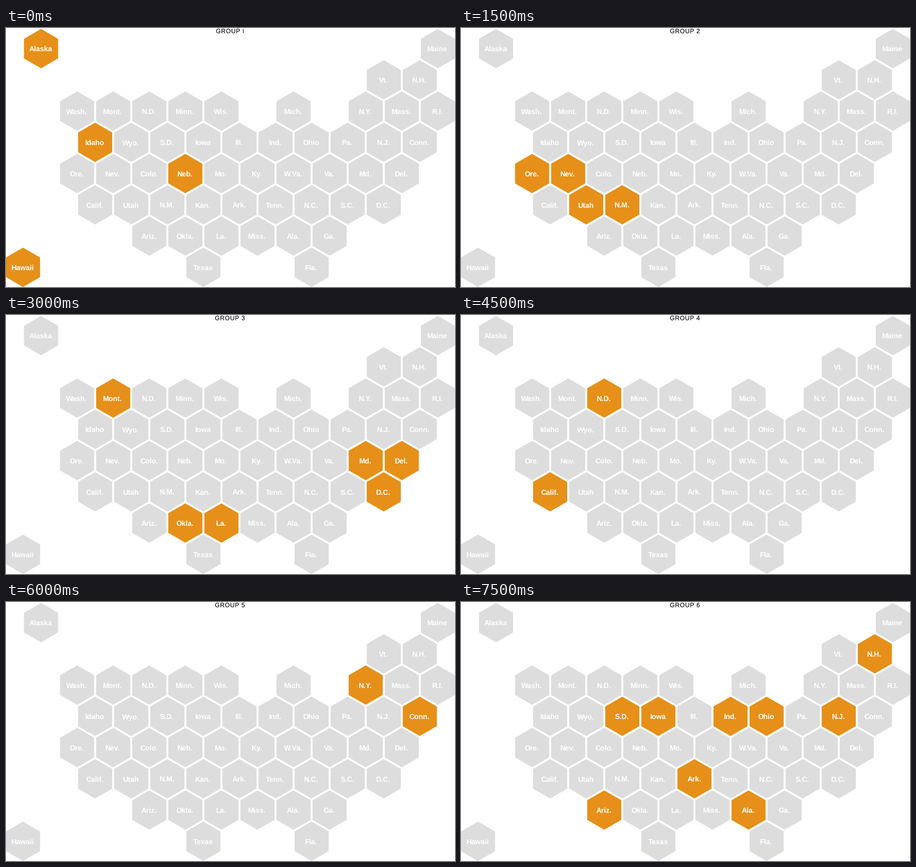
A matplotlib script that plays this animation: 985 by 569 pixels, repeating every 8000 ms.

```python
import matplotlib.pyplot as plt
from matplotlib.animation import FuncAnimation
from matplotlib.patches import PathPatch, RegularPolygon
from matplotlib.textpath import TextPath
from matplotlib.transforms import Affine2D

W, H, DPI = 985, 569, 64
PT = 72 / DPI  # points per pixel
ORANGE, GREY, INK = "#e69019", "#dddddd", "#222222"

# Hexagon grid: half-column and row steps, centre of the first cell
X0, Y0, DX, DY, RADIUS = 37.3, 45.3, 39.57, 68.63, 43.2

# Each run is (row, first half-column, labels two half-columns apart)
RUNS = [
    (0, 1, "Alaska"),
    (0, 23, "Maine"),
    (1, 20, "Vt. N.H."),
    (2, 3, "Wash. Mont. N.D. Minn. Wis."),
    (2, 15, "Mich."),
    (2, 19, "N.Y. Mass. R.I."),
    (3, 4, "Idaho Wyo. S.D. Iowa Ill. Ind. Ohio Pa. N.J. Conn."),
    (4, 3, "Ore. Nev. Colo. Neb. Mo. Ky. W.Va. Va. Md. Del."),
    (5, 4, "Calif. Utah N.M. Kan. Ark. Tenn. N.C. S.C. D.C."),
    (6, 7, "Ariz. Okla. La. Miss. Ala. Ga."),
    (7, 0, "Hawaii"),
    (7, 10, "Texas"),
    (7, 16, "Fla."),
]

GROUPS = [
    ("I", "Alaska Idaho Neb. Hawaii"),
    ("2", "Ore. Nev. Utah N.M."),
    ("3", "Mont. Md. Del. D.C. Okla. La."),
    ("4", "N.D. Calif."),
    ("5", "N.Y. Conn."),
    ("6", "N.H. S.D. Iowa Ind. Ohio N.J. Ark. Ariz. Ala."),
]

plt.rcParams["text.hinting"] = "none"
fig = plt.figure(figsize=(W / DPI, H / DPI), dpi=DPI, facecolor="white")
ax = fig.add_axes([0, 0, 1, 1])
ax.set_xlim(0, W)
ax.set_ylim(H, 0)
ax.axis("off")


def add_cell(row, col, label):
    x, y = X0 + col * DX, Y0 + row * DY
    cell = RegularPolygon((x, y), 6, radius=RADIUS, fc=GREY, lw=0)
    ax.add_patch(cell)
    ax.text(x - 0.7, y + 6, label, family="Liberation Sans", weight="bold",
            size=15.7 * PT, color="white", ha="center", va="baseline")
    return cell


def tracked_title(text, cx, baseline, size, tracking):
    """Draw letter-spaced text centred on cx and return its patches."""
    font = {"family": "Liberation Sans"}

    def outline(s):
        return TextPath((0, 0), s, size=size, prop=font)

    def right(s):
        return outline(s).get_extents().x1

    glyphs = [(outline(c), right(text[:i + 1]) - right(c) + i * tracking)
              for i, c in enumerate(text) if c != " "]
    left = glyphs[0][0].get_extents().x0
    end = glyphs[-1][0].get_extents().x1 + glyphs[-1][1]
    start = cx - (left + end) / 2
    patches = []
    for path, dx in glyphs:
        move = Affine2D().scale(1, -1).translate(start + dx, baseline)
        patch = PathPatch(move.transform_path(path), fc=INK, ec=INK,
                          lw=0.35 * PT)
        patches.append(ax.add_patch(patch))
    return patches


cells = {}
for row, first, labels in RUNS:
    for i, label in enumerate(labels.split()):
        cells[label] = add_cell(row, first + 2 * i, label)

titles = [tracked_title(f"GROUP {number}", 491.2, 11.3, 13.6, 0.8)
          for number, _ in GROUPS]
members = [set(names.split()) for _, names in GROUPS]


def draw(step):
    group = step // 3  # a new group every 1.5 s
    for label, cell in cells.items():
        cell.set_facecolor(ORANGE if label in members[group] else GREY)
    for i, title in enumerate(titles):
        for glyph in title:
            glyph.set_visible(i == group)
    return []


anim = FuncAnimation(fig, draw, frames=16, interval=500, repeat=True,
                     repeat_delay=0, init_func=lambda: draw(0))
plt.show()
```
